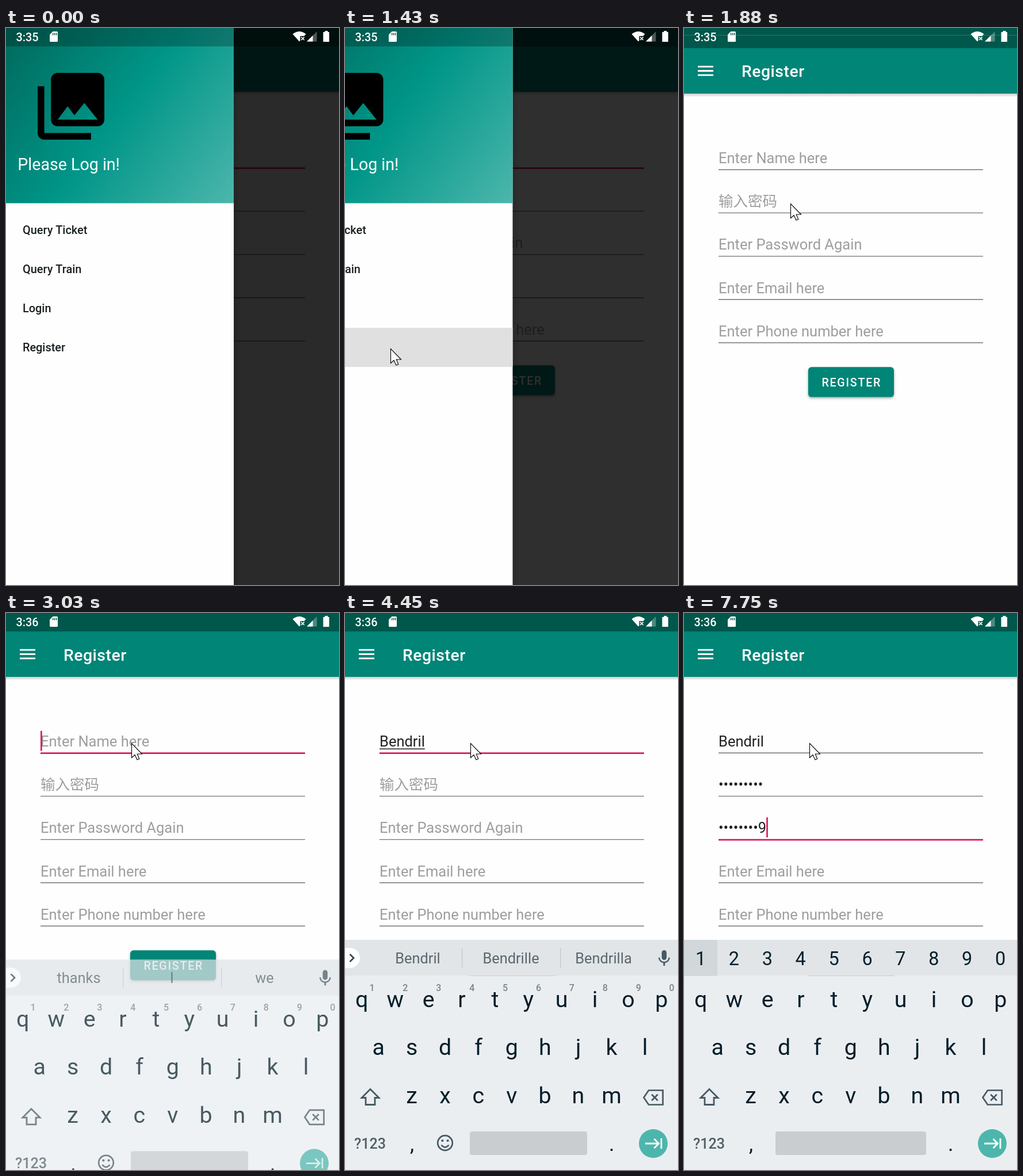
An HTML page with a canvas that plays this animation: 579 px wide and 968 px high, repeating every 8000 ms.

```html
<!DOCTYPE html>
<html lang="zh-Hans">
<head>
<meta charset="utf-8">
<title>Register</title>
<style>
html, body { margin: 0; width: 100%; height: 100%; overflow: hidden; background: #fefefe; }
canvas { display: block; }
</style>
</head>
<body>
<canvas id="stage" width="579" height="968"></canvas>
<script>
const W = 579, H = 968, LOOP = 8000, KEY = 57.9, ROW = 75.2;
const TEAL = '#008577', PINK = '#d81b60', BG = '#fefefe', INK = '#212121', SLATE = '#455a64', KEYINK = '#041e2a';
const NAME = 'Bendril', DIGITS = '123456789';
const HINTS = ['Enter Name here', '输入密码', 'Enter Password Again', 'Enter Email here', 'Enter Phone number here'];
const PASS_TIMES = [5480, 5540, 5600, 6240, 6320, 6400, 6670, 6740, 6810];
const c = document.getElementById('stage').getContext('2d');

const gallery = new Path2D('M22 16V4c0-1.1-.9-2-2-2H8c-1.1 0-2 .9-2 2v12c0 1.1.9 2 2 2h12c1.1 0 2-.9 2-2zM11 12l2.03 2.71L16 11l4 5H8zM2 6v14c0 1.1.9 2 2 2h14v-2H4V6z');
const mic = new Path2D('M12 14c1.66 0 3-1.34 3-3V5c0-1.66-1.34-3-3-3S9 3.34 9 5v6c0 1.66 1.34 3 3 3zM17.3 11c0 3-2.54 5.1-5.3 5.1S6.7 14 6.7 11H5c0 3.41 2.72 6.23 6 6.72V21h2v-3.28c3.28-.48 6-3.3 6-6.72z');
const arrow = new Path2D('M0 0V25L5.5 20L9.5 28.5L13.3 27L9.8 18.5H18Z');

const clamp = v => Math.max(0, Math.min(1, v));
const phase = (t, from, to) => clamp((t - from) / (to - from));
const easeOut = (k, n) => 1 - (1 - k) ** n;
const mix = (a, b, k) => a + (b - a) * k;

function text(s, x, y, size, color, { weight = 400, align = 'left', gap = 0 } = {}) {
  c.font = `${weight} ${size}px Roboto, "Noto Sans CJK SC", "Noto Sans CJK", sans-serif`;
  c.letterSpacing = gap + 'px';
  c.textAlign = align;
  c.fillStyle = color;
  c.fillText(s, x, y);
  return c.measureText(s).width;
}
function box(x, y, w, h, color, r = 0) {
  c.fillStyle = color;
  c.beginPath();
  c.roundRect(x, y, w, h, r);
  c.fill();
}
function disc(x, y, r, color) {
  c.fillStyle = color;
  c.beginPath();
  c.arc(x, y, r, 0, 7);
  c.fill();
}
function line(d, color, width) {
  c.strokeStyle = color;
  c.lineWidth = width;
  c.stroke(new Path2D(d));
}
function shape(d, color) {
  c.fillStyle = color;
  c.fill(new Path2D(d));
}
function icon(path, x, y, scale, color) {
  c.save();
  c.translate(x, y);
  c.scale(scale, scale);
  c.fillStyle = color;
  c.fill(path, 'evenodd');
  c.restore();
}
function fade(x0, y0, x1, y1, stops) {
  const g = c.createLinearGradient(x0, y0, x1, y1);
  stops.forEach((s, i) => g.addColorStop(i / (stops.length - 1), s));
  return g;
}

// fields: typed text per row; caret: whether it is lit
function page(focus, fields, caret, composing) {
  box(0, -60, W, H + 120, BG);
  box(0, 111, W, 6, fade(0, 111, 0, 117, ['rgba(0,0,0,.2)', 'rgba(0,0,0,0)']));
  box(0, -60, W, 92, '#00574b');
  box(0, 32, W, 79, TEAL);
  for (const y of [62.7, 70.1, 77.5]) box(24, y, 27, 2.8, '#fff');
  text('Register', 100, 82.5, 28.4, '#fff', { weight: 500, gap: .5 });

  HINTS.forEach((hint, i) => {
    const dy = i * ROW, value = fields[i] || '';
    const width = text(value || hint, 60, 232 + dy, 25.5, value ? INK : '#9e9e9e');
    if (i === focus) box(60, 242.3 + dy, 460, 2.8, PINK);
    else box(60, 242.5 + dy, 460, 1.4, '#747474');
    if (i !== focus) return;
    if (composing && value) box(60, 235.5 + dy, width, 1.4, INK);
    if (caret) box(60 + (value && width), 204.8 + dy, 2.7, 34.8, PINK);
  });

  c.save();
  c.shadowColor = 'rgba(0,0,0,.35)';
  c.shadowBlur = 4;
  c.shadowOffsetY = 2;
  box(216, 586.3, 149, 52, TEAL, 5.6);
  c.restore();
  text('REGISTER', 291.3, 620, 19.7, '#fff', { weight: 500, align: 'center', gap: 1.76 });
}

function drawer(x, selected) {
  c.save();
  c.translate(x, 0);
  box(396, 0, 12, H, fade(396, 0, 408, 0, ['rgba(0,0,0,.12)', 'rgba(0,0,0,0)']));
  if (x > -396) {
    box(0, 0, 396, H, BG);
    box(0, 0, 396, 304.5, fade(396, 304.5, 0, 0, ['#4db6ac', '#009688', '#00695c']));
    icon(gallery, 43.4, 66.4, 5.8, '#000');
    text('Please Log in!', 20.3, 247, 28.6, '#fff');
    if (selected) box(0, 521, 396, 68, '#e0e0e0');
    ['Query Ticket', 'Query Train', 'Login', 'Register'].forEach((s, i) =>
      text(s, 29, 358 + i * 68.15, 19.9, selected && i === 3 ? TEAL : '#1b2022', { weight: 500 }));
    box(0, 0, 396, 32, 'rgba(0,0,0,.25)');
  }
  c.restore();
}

function statusIcons(time) {
  text(time, 17.5, 22.8, 19.8, '#fff', { weight: 500 });
  shape('M81.5 6H88.5Q90 6 90 7.5V22.5Q90 24 88.5 24H77.5Q76 24 76 22.5V11.5Z', '#fff');
  for (const x of [81, 84, 87]) box(x, 8.5, 1.5, 4, '#00574b');
  shape('M498.5 10.5Q510 1.5 521.5 10.5L518.5 14H511.5V21.5L510 23.5Z', '#fff');
  line('M513.2 15.6L518.6 21M518.6 15.6L513.2 21', '#fff', 1.7);
  shape('M523 23.5L540.5 6V23.5Z', 'rgba(255,255,255,.3)');
  shape('M523 23.5L533.5 13V23.5Z', '#fff');
  shape('M554.5 5H559.5V7H562V24H551.5V7H554.5Z', '#fff');
}

function keyRow(keys, x, y, size) {
  [...keys].forEach((k, i) => text(k, x + i * KEY, y, size, KEYINK, { align: 'center' }));
}

function keyboard(dy, alpha, words) {
  c.save();
  c.translate(0, dy);
  c.globalAlpha = alpha;
  box(0, 568, W, 62.7, '#e1e5e8');
  box(0, 630.7, W, 340, '#ebeef1');

  if (words) {
    box(-20, 582, 46, 35, '#fff', 17.5);
    line('M8.5 593L15 599.5L8.5 606', '#37474f', 2.7);
    words.forEach((s, i) => text(s, [126.5, 288.5, 449.5][i], 609, 25.4, '#5a686e', { align: 'center' }));
    for (const x of [203, 374]) box(x, 582, 1.3, 34, '#c1c7ca');
    icon(mic, 538, 583.3, 1.41, SLATE);
    [...'1234567890'].forEach((k, i) =>
      text(k, 47 + i * KEY, 656.5, 16, '#78868c', { weight: 500, align: 'center' }));
    c.beginPath();
    c.arc(174, 921, 12.8, 0, 7);
    c.strokeStyle = SLATE;
    c.lineWidth = 2.7;
    c.stroke();
    disc(169.4, 917, 2.1, SLATE);
    disc(178.6, 917, 2.1, SLATE);
    line('M167.5 924.5Q174 932.5 180.5 924.5', SLATE, 2.5);
  } else {
    box(0, 568, 58, 62.7, '#d2d7d9');
    keyRow('1234567890', 29, 612, 32.4);
  }

  keyRow('qwertyuiop', 29.3, 684.5, 39.4);
  keyRow('asdfghjkl', 58.3, 768, 39.4);
  keyRow('zxcvbnm', 116, 852, 39.4);
  line('M44 827.5L59 842.5H52V854.5H36V842.5H29Z', SLATE, 2.8);
  line('M528 829.5H552.7V854.5H528L519.5 842ZM533.2 836.7L543.8 847.3M543.8 836.7L533.2 847.3', SLATE, 2.7);
  text('?123', 43.5, 930.5, 25.2, '#4f6067', { weight: 500, align: 'center' });
  text(',', 116.5, 935, 36, KEYINK, { align: 'center' });
  text('.', 463.8, 935, 36, KEYINK, { align: 'center' });
  const left = words ? 217 : 159;
  box(left, 901, 421 - left, 41, '#c9cdd0', 4);
  disc(536, 922, 25, '#4db6ac');
  line('M522 922H545M537.5 914L545.5 922L537.5 930M550 913V931', '#fff', 2.8);
  c.restore();
}

function cursor(t) {
  if (t < 60) return;
  const moves = [
    [60, 720, 477, 968, 79, 557, k => easeOut(k, 2)],
    [1700, 2020, 79, 557, 195, 282, k => easeOut(k, 3)],
    [2260, 2430, 195, 282, 218, 226, k => k * k * (3 - 2 * k)]
  ];
  const [from, to, x0, y0, x1, y1, ease] = moves.filter(m => t >= m[0]).pop();
  const k = ease(phase(t, from, to)), x = mix(x0, x1, k), y = mix(y0, y1, k);
  if ((t >= 1230 && t < 1350) || (t >= 2590 && t < 2750)) disc(x, y, 11, 'rgba(255,255,0,.45)');
  c.save();
  c.translate(Math.round(x) + .5, Math.round(y) + .5);
  c.fillStyle = '#fff';
  c.fill(arrow);
  c.strokeStyle = '#000';
  c.lineWidth = 1.1;
  c.stroke(arrow);
  c.restore();
}

const typed = (t, times) => times.filter(x => t >= x);
const secret = n => n ? '•'.repeat(n - 1) + DIGITS[n - 1] : '';

function form(t) {
  const nameKeys = typed(t, [...NAME].map((_, i) => 3620 + i * 85));
  const passKeys = typed(t, PASS_TIMES);
  const againKeys = typed(t, [...DIGITS].map((_, i) => 7370 + i * 47.5));
  const focus = t < 2750 ? -1 : t < 4510 ? 0 : t < 7050 ? 1 : 2;
  const name = NAME.slice(0, nameKeys.length);
  const pass = focus === 2 ? '•'.repeat(9) : secret(passKeys.length);
  // the caret blinks from the latest key press or focus change
  const lit = Math.max(...[2840, ...typed(t, [4540, 7050]), ...nameKeys, ...passKeys, ...againKeys]);
  const caret = t < lit || Math.floor((t - lit) / 320) % 2 === 0;
  page(focus, [name, pass, secret(againKeys.length)], caret, focus === 0);

  const k = phase(t, 2980, 3140);
  const words = name ? [name, NAME + 'le', NAME + 'la'] : ['thanks', 'I', 'we'];
  if (k > 0) keyboard(74 * (1 - k) ** 2, clamp(k * 2.25), t < 4540 && words);
}

function scrim(t) {
  if (t < 1410) return .835;
  if (t < 1430) return mix(.835, .82, phase(t, 1410, 1430));
  if (t < 1660) return mix(.82, .1, phase(t, 1430, 1660));
  return mix(.1, 0, phase(t, 1660, 1710));
}

function draw(t) {
  c.clearRect(0, 0, W, H);
  const k = phase(t, 1690, 2020);
  if (k < 1) {
    c.save();
    c.translate(0, -19 * easeOut(k, 3));
    page(0, [], false);
    c.restore();
    box(0, 0, W, H, `rgba(0,0,0,${scrim(t)})`);
    if (t < 1710) drawer(-396 * easeOut(phase(t, 1414, 1700), 5), t >= 1330);
  }
  if (k > 0) {
    c.save();
    c.beginPath();
    c.rect(0, H * (1 - k) ** 5, W, H);
    c.clip();
    c.translate(0, 40 * (1 - k) ** 3);
    form(t);
    c.restore();
  }
  statusIcons(t < 2070 ? '3:35' : '3:36');
  cursor(t);
}

const start = performance.now();
function tick() {
  draw((performance.now() - start) % LOOP);
  requestAnimationFrame(tick);
}
tick();
</script>
</body>
</html>
```
